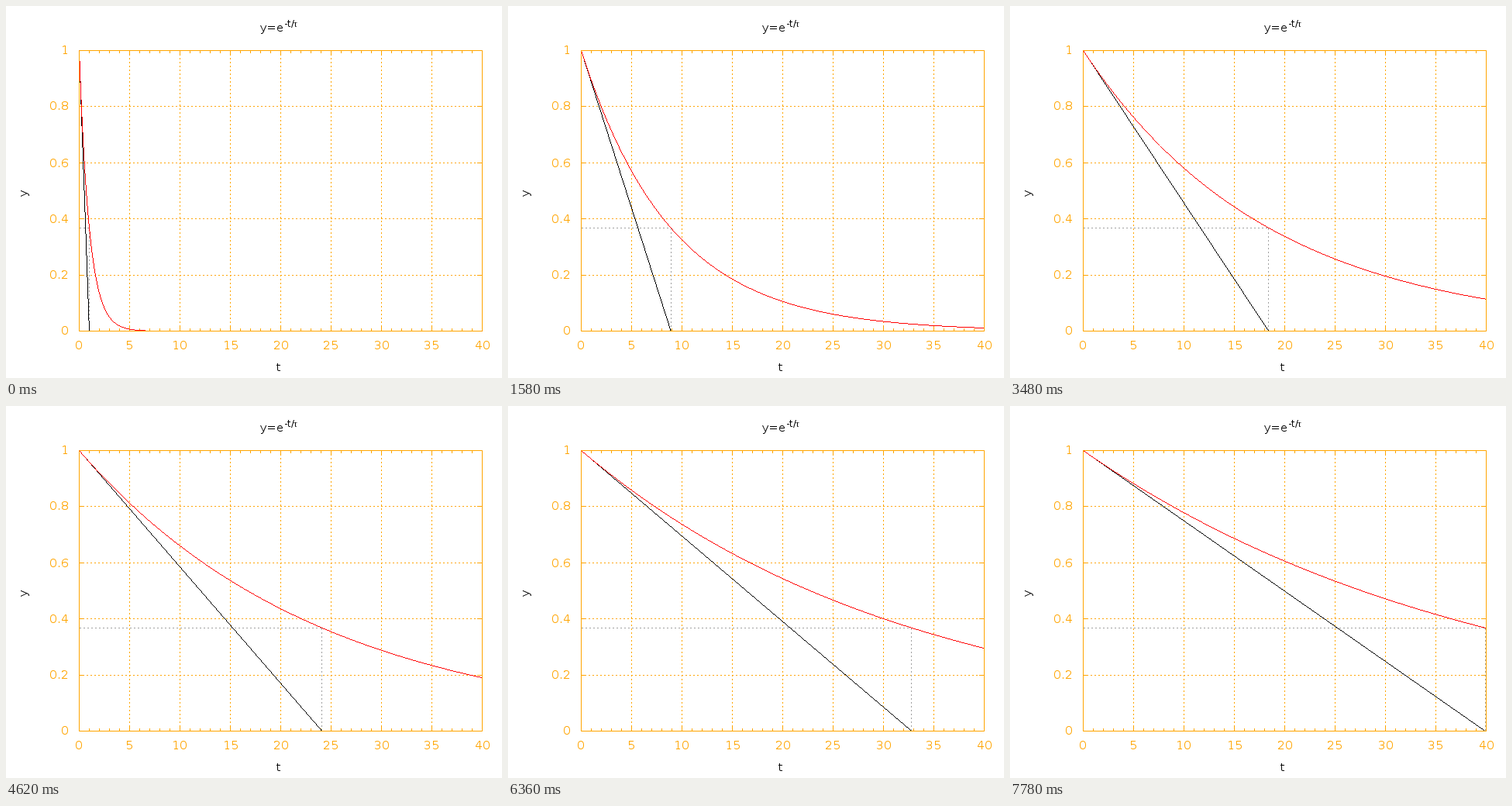
Animation, 640 px wide and 480 px high, one loop 7800 ms. Source, as a matplotlib script:

```python
import numpy as np
import matplotlib.pyplot as plt
from matplotlib.animation import FuncAnimation
from matplotlib.patches import Rectangle

plt.rcParams.update({
    "font.family": "DejaVu Sans",
    "text.hinting": "default",
    "text.hinting_factor": 1,
    "path.simplify": False,
})

DPI, FRAMES, STEP_MS = 100, 390, 20
PX = 72 / DPI                      # one pixel in points
LEFT, RIGHT, TOP, BOTTOM = 94, 614, 57, 419
T_MAX = 40
ORANGE, GRAY = "#ffa500", "#a0a0a0"
DOTS = (0, (2, 3))
SIZE = 14.67
SUPER = 0.8 * SIZE


def to_x(t):
    return LEFT + 0.5 + t * (RIGHT - LEFT) / T_MAX


def to_y(v):
    return BOTTOM + 0.5 - v * (BOTTOM - TOP)


def crisp(p):
    """Centre of the pixel that holds p."""
    return np.floor(p) + 0.5


fig = plt.figure(figsize=(6.4, 4.8), dpi=DPI, facecolor="white")
ax = fig.add_axes([0, 0, 1, 1])
ax.set_xlim(0, 640)
ax.set_ylim(480, 0)
ax.axis("off")


def label(x, y, s, size=SIZE, color="black", ha="center", **kw):
    ax.text(x, y, s, fontsize=size * PX, color=color, ha=ha,
            va="baseline", **kw)


def segments(draw, at, start, end, **kw):
    draw(at, start, end, colors=ORANGE, lw=PX, snap=False, zorder=1, **kw)


def line(color, zorder, **kw):
    return ax.plot([], [], color=color, lw=PX, zorder=zorder, snap=False,
                   solid_capstyle="butt", dash_capstyle="butt", **kw)[0]


def trace(artist, px, py):
    """Draw a falling path one pixel wide, without smoothing."""
    cols = np.arange(LEFT, np.floor(px[-1]) + 1) + 0.5
    rows = np.arange(TOP, BOTTOM + 1) + 0.5
    slope = np.gradient(py, px)
    flat = cols[np.interp(cols, px, slope) <= 1]
    x_at = np.interp(rows, py, px)
    steep = (np.interp(x_at, px, slope) > 1) & (rows <= py[-1])
    x = np.concatenate([crisp(x_at[steep]), flat])
    y = np.concatenate([rows[steep], crisp(np.interp(flat, px, py))])
    gap = np.full_like(x, np.nan)
    artist.set_data(np.stack([x - 0.5, x + 0.5, gap], axis=1).ravel(),
                    np.stack([y, y, gap], axis=1).ravel())


# grid, ticks and tick labels
major_x = crisp(to_x(np.arange(0, T_MAX + 1, 5)))
minor_x = crisp(to_x(np.arange(T_MAX + 1)))
values = np.arange(6) / 5
major_y = crisp(to_y(values))

segments(ax.vlines, major_x[1:-1], BOTTOM, TOP, linestyles=DOTS)
segments(ax.hlines, major_y[1:-1], LEFT, RIGHT, linestyles=DOTS)
for xs, size in ((major_x, 6), (minor_x, 3)):
    segments(ax.vlines, xs, BOTTOM - size, BOTTOM)
    segments(ax.vlines, xs, TOP + 1, TOP + 1 + size)
segments(ax.hlines, major_y, LEFT + 1, LEFT + 1 + 6)
segments(ax.hlines, major_y, RIGHT - 6, RIGHT)

for x, t in zip(major_x, range(0, T_MAX + 1, 5)):
    label(x, 443, str(t), color=ORANGE)
for y, v in zip(major_y, values):
    label(81, y + 5, f"{v:g}", color=ORANGE, ha="right")

# border lies over the curves
ax.add_patch(Rectangle((LEFT + 0.5, TOP + 0.5), RIGHT - LEFT, BOTTOM - TOP,
                       fill=False, ec=ORANGE, lw=PX, snap=False, zorder=6))

# title and axis names
label(328, 33, "y=e", ha="left")
label(359, 27, "-t/", size=SUPER, ha="left")
label(371, 27, "τ", size=SUPER, ha="left", family="Liberation Serif")
label(352, 471, "t")
label(28, 241, "y", rotation=90, rotation_mode="anchor")

# moving parts
across = line(GRAY, 2, ls=DOTS)
down = line(GRAY, 2, ls=DOTS)
tangent = line("black", 3)
curve = line("red", 4)

ts = np.linspace(0, T_MAX, 1041)
level = crisp(to_y(np.exp(-1)))


def update(i):
    tau = 1 + 0.1 * i
    x = to_x(tau)
    across.set_data([LEFT + 1, x], [level, level])
    down.set_data([crisp(x)] * 2, [BOTTOM, level])
    trace(tangent, np.array([to_x(0), x]), np.array([to_y(1), to_y(0)]))
    trace(curve, to_x(ts), to_y(np.exp(-ts / tau)))
    return across, down, tangent, curve


anim = FuncAnimation(fig, update, frames=FRAMES, interval=STEP_MS,
                     repeat=True, repeat_delay=0)
plt.show()
```
